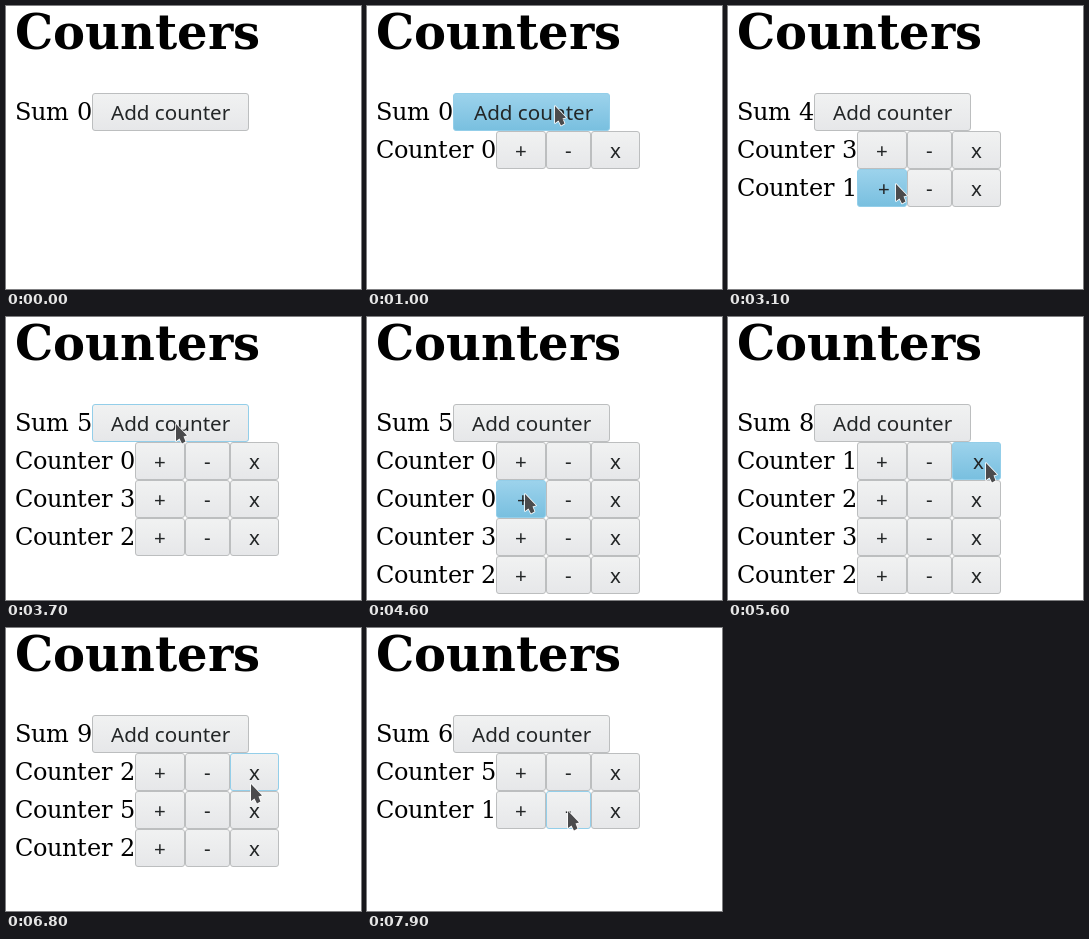
Write an HTML page with a canvas that moves like this. It is 355x283 px and loops after 8 s.

```html
<!DOCTYPE html>
<html lang="en">
<head>
<meta charset="utf-8">
<title>Counters</title>
<style>
  html, body { margin: 0; width: 100%; height: 100%; overflow: hidden; background: #fff; }
  canvas { display: block; }
</style>
</head>
<body>
<canvas id="stage" width="355" height="283"></canvas>
<script>
const ctx = document.getElementById('stage').getContext('2d');
const LOOP = 8000, TICK = 100;
const LEFT = 9, TOP = 87, ROW = 38, BASELINE = 27, PADDING = 19;
const BUTTON_FONT = '20.6px "Noto Sans", sans-serif';
const serifFont = (size, weight) => `${weight} ${size}px "DejaVu Serif", serif`;

// Sets text with whole-pixel advances and returns where it ends.
function serif(text, y, size, weight = 'normal') {
  ctx.font = serifFont(size, weight);
  ctx.fillStyle = '#000';
  let x = LEFT;
  for (const char of text) {
    ctx.fillText(char, x, y);
    x += Math.round(ctx.measureText(char).width);
  }
  return x;
}

// Lays buttons out side by side after a line of text.
function layOut(text, actions) {
  let x = serif(text, 0, 24);
  ctx.font = BUTTON_FONT;
  return Object.entries(actions).map(([label, run]) => {
    const w = Math.round(ctx.measureText(label).width + 2 * PADDING);
    x += w;
    return { label, run, w, x: x - w };
  });
}

const sumButtons = layOut('Sum 0', { 'Add counter': counters => counters.unshift(0) });
const rowButtons = layOut('Counter 0', {
  '+': (counters, i) => counters[i]++,
  '-': (counters, i) => counters[i]--,
  'x': (counters, i) => counters.splice(i, 1)
});

// Row 0 holds the sum; counters start at row 1.
const buttonsIn = row => row === 0 ? sumButtons : rowButtons;

function buttonAt(pointer, counters) {
  if (!pointer) return null;
  const row = Math.floor((pointer.y - TOP) / ROW);
  if (row < 0 || row > counters.length) return null;
  const button = buttonsIn(row).find(b => pointer.x >= b.x && pointer.x < b.x + b.w);
  return button ? { row, button } : null;
}

const path = [], presses = new Set();
let last = null;

// Glides to a point, arriving at the given tick.
function go(arrival, steps, x, y) {
  const from = last || { x, y };
  for (let i = 1; i <= steps; i++) {
    const k = i / steps;
    path[arrival - steps + i] = { x: from.x + (x - from.x) * k, y: from.y + (y - from.y) * k };
  }
  last = { x, y };
}

function click(tick, times = 1, gap = 2) {
  for (let i = 0; i < times; i++) presses.add(tick + i * gap);
}

go(3, 1, 222, 140);
go(5, 2, 188, 100);  click(6, 2, 4);
go(17, 3, 170, 151); click(18, 3);
go(26, 3, 168, 178); click(27, 2, 4);
go(34, 2, 170, 107); click(36, 2, 3);
go(42, 2, 163, 146);
go(45, 2, 158, 177); click(46, 2, 3);
go(51, 1, 158, 150); click(52);
go(55, 2, 258, 146); click(56);
go(62, 5, 160, 184); click(63, 2);
go(68, 2, 245, 156);
go(70, 2, 250, 148); click(72);
go(77, 4, 201, 183); click(78);

function stateAt(lastTick) {
  const counters = [];
  let pointer = null;
  for (let tick = 0; tick <= lastTick; tick++) {
    pointer = path[tick] || pointer;
    if (presses.has(tick - 1)) {
      const hit = buttonAt(pointer, counters);
      if (hit) hit.button.run(counters, hit.row - 1);
    }
  }
  return { counters, pointer, hit: buttonAt(pointer, counters), pressed: presses.has(lastTick) };
}

function drawButton({ label, x, w }, y, hover, pressed) {
  const fill = ctx.createLinearGradient(0, y, 0, y + ROW);
  fill.addColorStop(0, pressed ? '#9dd3ec' : '#f1f2f2');
  fill.addColorStop(1, pressed ? '#78bfdf' : '#e6e7e9');
  ctx.beginPath();
  ctx.roundRect(x + 0.5, y + 0.5, w - 1, ROW - 1, 2.5);
  ctx.fillStyle = fill;
  ctx.fill();
  ctx.lineWidth = 1;
  ctx.strokeStyle = hover ? '#93cee9' : '#bcbebf';
  ctx.stroke();
  ctx.font = BUTTON_FONT;
  ctx.fillStyle = '#232627';
  ctx.fillText(label, x + PADDING + (pressed ? 2 : 0), y + BASELINE);
}

const arrow = new Path2D('M0 0L11 11.5L7.5 12.5L9.5 17.5L6 19.5L3.5 14.5L0 17Z');

function drawPointer({ x, y }) {
  ctx.save();
  ctx.translate(Math.round(x), Math.round(y));
  ctx.lineJoin = 'round';
  ctx.lineWidth = 1.6;
  ctx.strokeStyle = '#fff';
  ctx.stroke(arrow);
  ctx.fillStyle = '#4b4b4d';
  ctx.fill(arrow);
  ctx.restore();
}

function draw({ counters, pointer, hit, pressed }) {
  ctx.fillStyle = '#fff';
  ctx.fillRect(0, 0, 355, 283);
  serif('Counters', 43, 48, 'bold');
  const sum = counters.reduce((a, b) => a + b, 0);
  const lines = [`Sum ${sum}`, ...counters.map(n => `Counter ${n}`)];
  lines.forEach((text, row) => {
    const y = TOP + row * ROW;
    serif(text, y + BASELINE, 24);
    for (const button of buttonsIn(row)) {
      const hover = Boolean(hit) && hit.row === row && hit.button === button;
      drawButton(button, y, hover, hover && pressed);
    }
  });
  if (pointer) drawPointer(pointer);
}

const start = performance.now();
function frame() {
  const time = (performance.now() - start) % LOOP;
  draw(stateAt(Math.floor(time / TICK)));
  requestAnimationFrame(frame);
}
frame();
</script>
</body>
</html>
```
